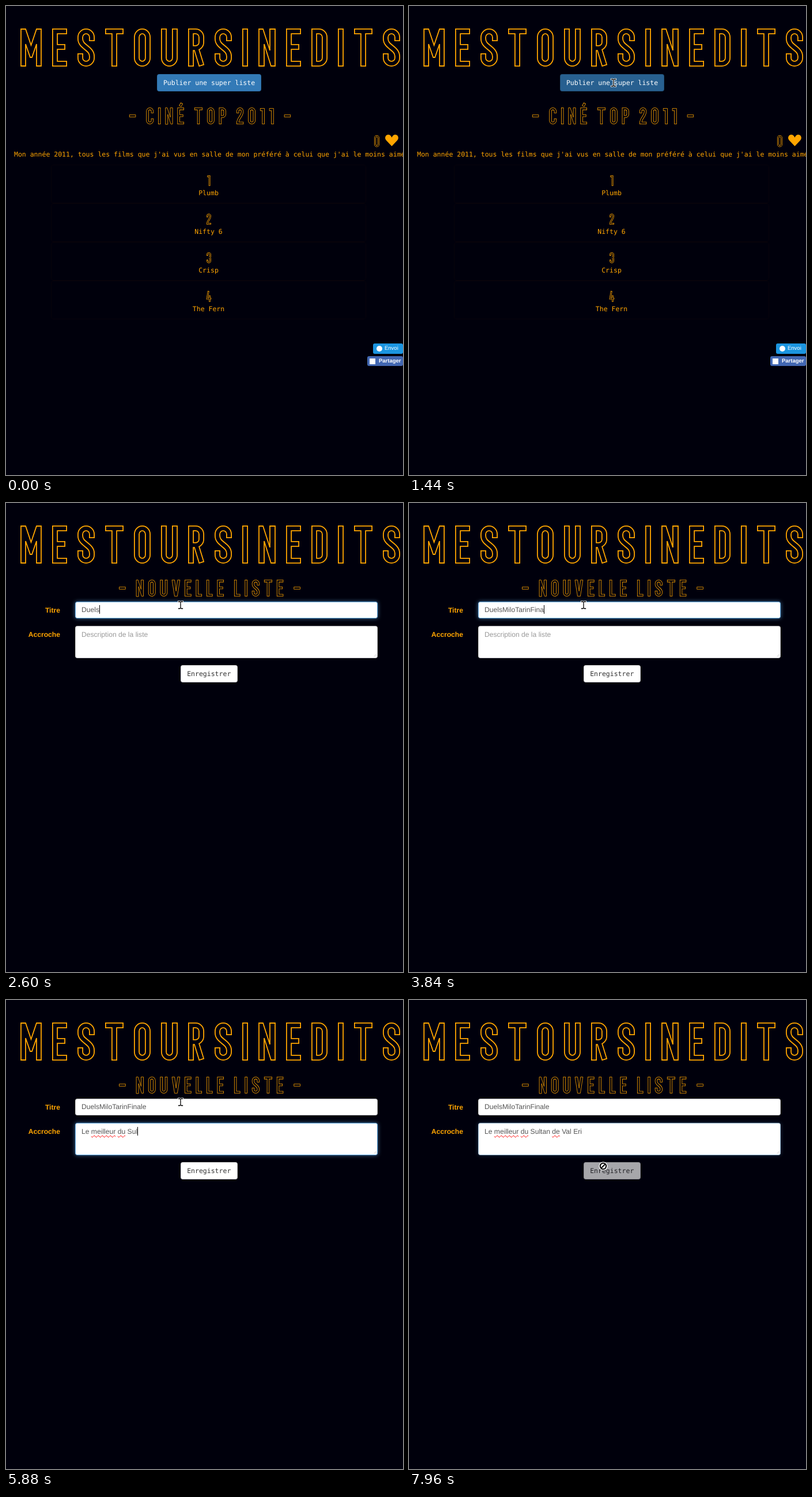
Recreate the animation shown at these times as an HTML page. Size 689 px wide and 813 px high, loop 8000 ms.

```html
<!DOCTYPE html>
<html lang="fr">
<head>
<meta charset="utf-8">
<title>Listes</title>
<style>
  html, body { margin: 0; width: 100%; height: 100%; overflow: hidden; background: #00000c; }
  body {
    position: relative; color: #ffa500; text-rendering: geometricPrecision;
    font: 11.5px/20px "DejaVu Sans Mono", monospace; white-space: pre;
  }
  body *, svg { box-sizing: border-box; }
  div, svg { position: absolute; }
  svg { left: 0; top: 0; width: 689px; height: 813px; overflow: hidden; }
  .page { inset: 0; }
  .btn { height: 30px; border: 1px solid; border-radius: 3.5px; line-height: 28px; text-align: center; }
  #publish { left: 262px; top: 118px; width: 181px; color: #fff; }
  #save { left: 303px; top: 281px; width: 98.5px; color: #333; }
  .item {
    left: 78px; width: 547px; height: 67px; padding-top: 38px; text-align: center;
    border: 1px solid #08030b; border-radius: 4px;
  }
  .share { right: 0; height: 17.5px; color: #fff; border-radius: 3px; line-height: 18px; }
  .share, .label, .field { font-family: "Liberation Sans", Arial, sans-serif; }
  .share { font-size: 9.5px; }
  .share i { position: absolute; background: #fff; top: 4px; width: 10px; height: 10px; }
  .label { right: 595px; font-size: 12.13px; font-weight: bold; }
  .field {
    --k: 0; left: 120px; width: 525px; padding-left: 10px; border: 1px solid;
    border-radius: 3.5px; background: #fff; color: #555; font-size: 12.13px;
    border-color: color-mix(in srgb, #66afe9 calc(var(--k) * 100%), #ccc);
    box-shadow: inset 0 1px 1px rgb(0 0 0 / .075), 0 0 7px rgb(102 175 233 / calc(.6 * var(--k)));
  }
  .field s { color: #999; text-decoration: none; }
  .field u { text-decoration: underline wavy #f00 1px; text-underline-offset: 2px; }
  .field b { display: inline-block; width: 1px; height: 15px; margin-right: -1px; background: #000; vertical-align: -3px; }
  #name { top: 171px; height: 29px; line-height: 27px; }
  #pitch { top: 213px; height: 55.5px; padding-top: 4px; }
</style>
</head>
<body>
<svg id="banner"></svg>

<div class="page" id="list">
  <svg id="listArt"></svg>
  <div class="btn" id="publish">Publier une super liste</div>
  <div style="left:14px;top:247px">Mon année 2011, tous les films que j'ai vus en salle de mon préféré à celui que j'ai le moins aimé</div>
  <div class="share" style="top:585px;width:52px;padding-left:20px;background:#1b95e0"><i style="left:6px;border-radius:50%"></i>Envoi</div>
  <div class="share" style="top:606.5px;width:62px;padding-left:20px;background:#4267b2;font-weight:bold"><i style="left:4px"></i>Partager</div>
</div>

<div class="page" id="form">
  <svg id="formArt"></svg>
  <div class="label" style="top:176px">Titre</div>
  <div class="label" style="top:218px">Accroche</div>
  <div class="field" id="name"></div>
  <div class="field" id="pitch"></div>
  <svg><path d="M638.500 266.500l5-5m-2 5l3-3" stroke="#bbb" stroke-width=".7"/></svg>
  <div class="btn" id="save">Enregistrer</div>
</div>

<svg>
  <g id="cursor">
    <g id="beam" fill="none">
      <path d="M-3.500-6H-1.500L0-5 1.500-6H3.500M0-5V5M-3.500 6H-1.500L0 5 1.500 6H3.500" stroke="#fff" stroke-width="3.200" stroke-linecap="square"/>
      <path d="M-3.500-6H-1.500L0-5 1.500-6H3.500M0-5V5M-3.500 6H-1.500L0 5 1.500 6H3.500" stroke="#000" stroke-width="1.300" stroke-linecap="square"/>
    </g>
    <g id="denied">
      <circle r="7.500" fill="#fff"/>
      <circle r="5.200" fill="#fff" stroke="#000" stroke-width="2"/>
      <path d="M-3.500 3.500L3.500-3.500" stroke="#000" stroke-width="2"/>
    </g>
  </g>
</svg>

<script>
const $ = id => document.getElementById(id);

// Condensed outline lettering: [width, path], 66 units tall.
// Most paths are centre lines; those in CONTOURS are the outline itself.
const O = 'M5 15a9.5 10 0 0 1 19 0V51a9.5 10 0 0 1-19 0Z';
const E = 'M21 5H5V61H21M5 32H18';
const GLYPHS = {
  ' ': [5, ''],
  '-': [26, 'M5 33H21'],
  C: [29, 'M24 17V15a9.5 10 0 0 0-19 0V51a9.5 10 0 0 0 19 0V48'],
  D: [28, 'M5 5H13a10 10 0 0 1 10 10V51a10 10 0 0 1-10 10H5Z'],
  E: [26, E],
  É: [26, E + 'M13-9L15-13'],
  I: [10, 'M5 5V61'],
  L: [24, 'M5 5V61H19'],
  M: [37, 'M1 65V1H9L18.5 29 28 1H36V65H28V27L20 50H17L9 27V65Z'],
  N: [30, 'M1 65V1H8L20 38V1H29V65H22L10 27V65Z'],
  O: [29, O],
  P: [28, 'M5 61V5H13a10 10 0 0 1 10 10V26a10 10 0 0 1-10 10H5'],
  R: [28, 'M5 61V5H13a10 10 0 0 1 10 10V24a10 10 0 0 1-10 10H5M14 34L22 60'],
  S: [30, 'M25 17V15a10 10 0 0 0-20 0V18C5 32 25 34 25 48V51a10 10 0 0 1-20 0V48'],
  T: [32, 'M5 5H27M16 5V61'],
  U: [29, 'M5 5V51a9.5 10 0 0 0 19 0V5'],
  V: [32, 'M1 1H10L16 45 22 1H31L21 65H11Z'],
  0: [29, O],
  1: [18, 'M5 8H13V61'],
  2: [28, 'M5 17V15a9 10 0 0 1 18 0C23 36 5 40 5 61H23'],
  3: [28, 'M5 16V15a9 10 0 0 1 18 0V24Q23 32 14 32Q23 32 23 42V51a9 10 0 0 1-18 0V50'],
  4: [30, 'M12 5L5 46H25M20 32V61']
};
const CONTOURS = 'MNV', GAP = 18, STEM = 10;

function sign(text, x, y, scale, centred = true) {
  const line = Math.max(1.8, 0.8 / scale);
  let pos = 0, out = '';
  const stroke = (d, color, width) =>
    out += `<path d="${d}" transform="translate(${pos})" stroke="${color}" stroke-width="${width}"/>`;
  for (const ch of text) {
    const [width, d] = GLYPHS[ch];
    if (CONTOURS.includes(ch)) stroke(d, '#ffa500', line);
    else {
      stroke(d, '#ffa500', STEM);
      stroke(d, '#00000c', STEM - 2 * line);
    }
    pos += width + GAP;
  }
  const left = centred ? x - (pos - GAP) * scale / 2 : x;
  return `<g role="img" aria-label="${text}" fill="none" stroke-linecap="square" transform="translate(${left} ${y}) scale(${scale})">${out}</g>`;
}

$('banner').innerHTML = sign('MESTOURSINEDITS', 25, 39, 1, false);
$('formArt').innerHTML = sign('- NOUVELLE LISTE -', 353.5, 133, 0.44);
$('listArt').innerHTML = sign('- CINÉ TOP 2011 -', 354, 176, 0.44) + sign('0', 643.5, 224, 0.31) +
  '<path fill="#ffa500" d="M669.500 243L660 233C655 227 661 221 666 223.500Q668.500 225 669.500 228Q670.500 225 673 223.500C678 221 684 227 679 233Z"/>';
['Plumb', 'Nifty 6', 'Crisp', 'The Fern'].forEach((film, i) => {
  const top = 275 + 67 * i;
  $('list').insertAdjacentHTML('beforeend', `<div class="item" style="top:${top}px">${film}</div>`);
  $('listArt').innerHTML += sign(String(i + 1), 352, top + 18, 0.285);
});

// Typing bursts: [start, count, end, count]
const NAME = 'DuelsMiloTarinFinale';
const NAME_KEYS = [[2320, 1, 2600, 5], [2840, 6, 3040, 9], [3200, 10, 3840, 18], [4160, 19, 4200, 20]];
const PITCH = 'Le meilleur du Sultan de Val Eri';
const PITCH_KEYS = [[4680, 1, 5480, 15], [5520, 16, 5600, 17], [5840, 18, 6280, 25], [6560, 26, 6720, 28], [6880, 29, 7160, 32]];
// Pointer stops: [time, x, y]
const STOPS = [[480, 647, 134], [1040, 355, 133], [1640, 355, 133], [1800, 303, 177],
  [7560, 303, 177], [7600, 317, 227], [7840, 337, 288]];

const ramp = (t, a, b) => Math.min(1, Math.max(0, (t - a) / (b - a)));

function typed(text, keys, t) {
  const key = keys.filter(k => t >= k[0]).pop();
  if (!key) return '';
  const [a, from, b, to] = key;
  return text.slice(0, Math.floor(from + (to - from) * ramp(t, a, b)));
}

function pointer(t) {
  const i = Math.max(0, STOPS.findLastIndex(s => t >= s[0]));
  const a = STOPS[i], b = STOPS[i + 1] || a;
  const k = a === b ? 0 : ramp(t, a[0], b[0]);
  const e = k * k * (3 - 2 * k);
  return [a[1] + (b[1] - a[1]) * e, a[2] + (b[2] - a[2]) * e];
}

function fill(id, text, hint, caret, glow) {
  const spelled = text.replace(/\b(meilleur|du|de) /g, '<u>$1</u> ');
  const bar = caret ? '<b></b>' : '';
  $(id).innerHTML = text ? spelled + bar : bar + `<s>${hint}</s>`;
  $(id).style.setProperty('--k', glow);
}

function paint(id, back, border) {
  $(id).style.background = back;
  $(id).style.borderColor = border;
}

function draw(now) {
  const t = Math.floor(now % 8000 / 40) * 40;
  const [x, y] = pointer(t);
  const onForm = t >= 1480, disabled = t >= 7840;
  $('list').style.display = onForm ? 'none' : '';
  $('form').style.display = onForm ? '' : 'none';

  if (t >= 1240 && t < 1400) paint('publish', '#204d74', '#122b40');
  else if (t >= 480 && x < 443) paint('publish', '#286090', '#204d74');
  else paint('publish', '#337ab7', '#2e6da4');
  if (y > 281 && !disabled) paint('save', '#e6e6e6', '#adadad');
  else paint('save', '#fff', '#ccc');
  $('save').style.opacity = disabled ? 0.65 : 1;

  const swap = ramp(t, 4240, 4400);
  fill('name', typed(NAME, NAME_KEYS, t), 'Titre de la liste', t >= 1800 && t < 4240, ramp(t, 1800, 1960) - swap);
  fill('pitch', typed(PITCH, PITCH_KEYS, t), 'Description de la liste', t >= 4240 && !disabled, swap - ramp(t, 7860, 8040));

  $('cursor').setAttribute('transform', `translate(${x} ${y})`);
  $('cursor').style.display = t < 480 ? 'none' : '';
  $('beam').style.display = disabled ? 'none' : '';
  $('denied').style.display = disabled ? '' : 'none';
}

const start = performance.now();
function tick() {
  draw(performance.now() - start);
  requestAnimationFrame(tick);
}
tick();
</script>
</body>
</html>
```
